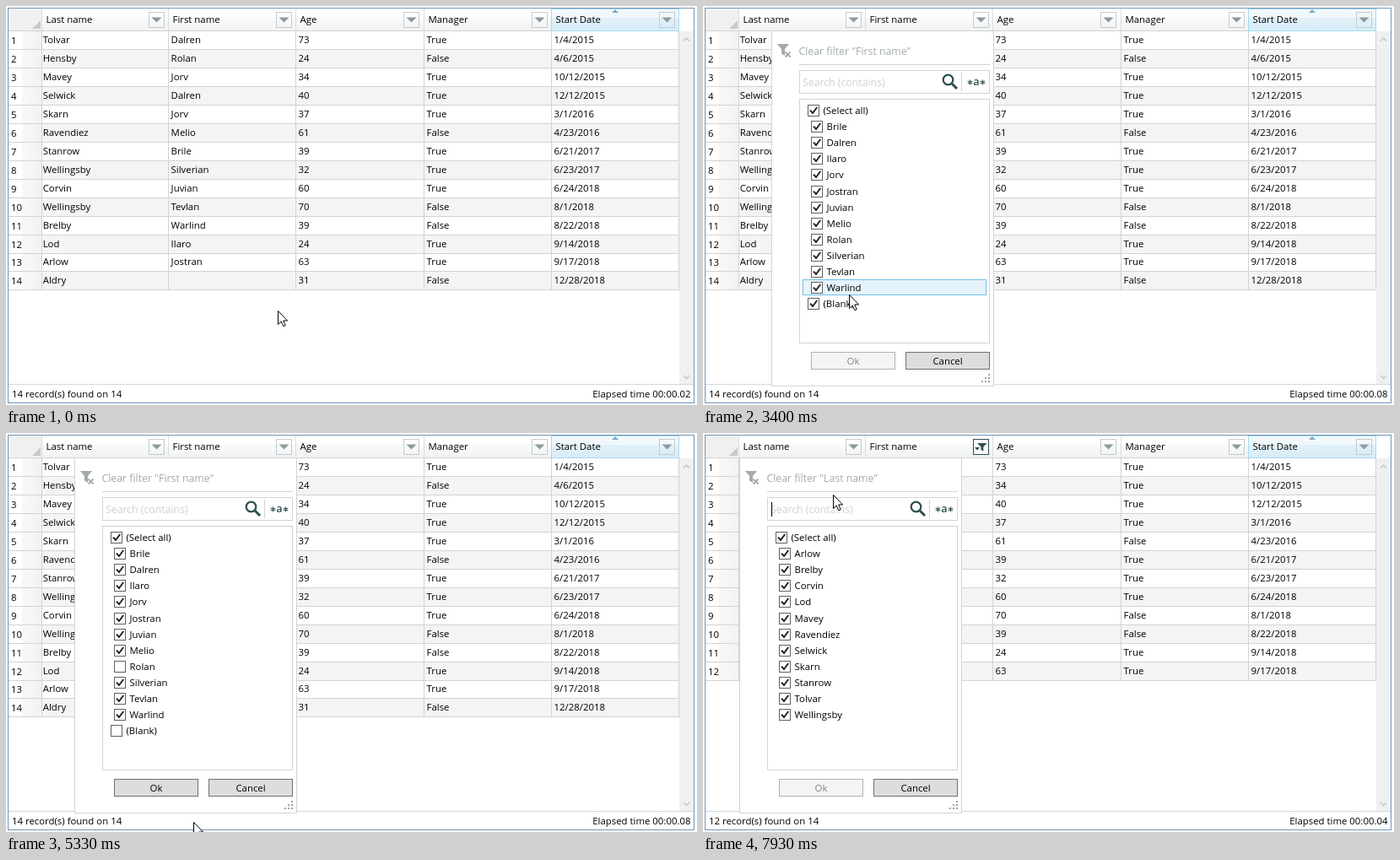
An HTML page that plays this animation: 819x473 px, repeating every 8000 ms.

```html
<!DOCTYPE html>
<html lang="en">
<head>
<meta charset="utf-8">
<title>Grid column filter</title>
<style>
html, body { margin: 0; width: 100%; height: 100%; overflow: hidden; background: #fff; }
svg { display: block; width: 819px; height: 473px; font: 11.4px "Open Sans", sans-serif; }
text { white-space: pre; }
rect { shape-rendering: crispEdges; }
.big { font-size: 12.3px; }
.off { display: none; }
</style>
</head>
<body>
<svg id="stage" viewBox="0 0 819 473">
  <defs>
    <linearGradient id="head" x2="0" y2="1">
      <stop offset=".4" stop-color="#fff"/><stop offset=".4" stop-color="#f9fafb"/><stop offset="1" stop-color="#f1f2f4"/>
    </linearGradient>
    <linearGradient id="side">
      <stop offset=".4" stop-color="#fff"/><stop offset=".4" stop-color="#f7f8fa"/><stop offset="1" stop-color="#f1f2f4"/>
    </linearGradient>
    <linearGradient id="sorted" x2="0" y2="1">
      <stop offset="0" stop-color="#f2f9fc"/><stop offset=".4" stop-color="#f0f8fc"/>
      <stop offset=".4" stop-color="#e1f1f9"/><stop offset="1" stop-color="#d8ecf6"/>
    </linearGradient>
    <linearGradient id="hot" x2="0" y2="1">
      <stop offset=".4" stop-color="#e3f7ff"/><stop offset=".4" stop-color="#bdedff"/><stop offset="1" stop-color="#b7e7fb"/>
    </linearGradient>
  </defs>
</svg>
<script>
const TICK = 1000 / 15, LOOP = 8000;
const LINE = '#d3d3d3', DARK = '#2f4f4f';
const EDGES = [42, 192, 343, 495, 646, 797];
const HEADS = ['Last name', 'First name', 'Age', 'Manager', 'Start Date'];
const ROWS = `Tolvar,Dalren,73,True,1/4/2015
Hensby,Rolan,24,False,4/6/2015
Mavey,Jorv,34,True,10/12/2015
Selwick,Dalren,40,True,12/12/2015
Skarn,Jorv,37,True,3/1/2016
Ravendiez,Melio,61,False,4/23/2016
Stanrow,Brile,39,True,6/21/2017
Wellingsby,Silverian,32,True,6/23/2017
Corvin,Juvian,60,True,6/24/2018
Wellingsby,Tevlan,70,False,8/1/2018
Brelby,Warlind,39,False,8/22/2018
Lod,Ilaro,24,True,9/14/2018
Arlow,Jostran,63,True,9/17/2018
Aldry,,31,False,12/28/2018`.split('\n').map(r => r.split(','));
const UNCHECKED = 'Rolan';
const KEPT = ROWS.filter(r => r[1] && r[1] !== UNCHECKED);

// Pointer path: tick, x, y
const PATH = [
  [13, 322, 361], [15, 320, 345], [18, 316, 255], [22, 319, 130], [26, 329, 49], [28, 331, 26], [31, 331, 18],
  [45, 331, 18], [46, 326, 30], [48, 270, 150], [50, 196, 305], [51, 173, 342], [54, 150, 350], [58, 131, 351],
  [62, 131, 351], [64, 141, 325], [66, 149, 298], [69, 146, 285], [73, 136, 278],
  [74, 136, 278], [77, 172, 360], [80, 222, 461], [82, 215, 462], [85, 182, 421],
  [94, 182, 421], [96, 180, 370], [99, 176, 190], [102, 173, 62], [103, 174, 47], [105, 178, 26], [108, 180, 21],
  [117, 180, 21], [119, 154, 73]
];

const fill = (x, y, w, h, color, attrs = '') =>
  `<rect x="${x}" y="${y}" width="${w}" height="${h}" fill="${color}" ${attrs}/>`;
const box = (x, y, w, h, color, stroke, attrs = '') =>
  fill(x + .5, y + .5, w - 1, h - 1, color, `stroke="${stroke}" ${attrs}`);
const text = (x, y, s, color = '#000', attrs = '') =>
  `<text x="${x}" y="${y}" fill="${color}" ${attrs}>${s}</text>`;
const path = (d, color, attrs = '') => `<path d="${d}" fill="${color}" ${attrs}/>`;
const stroke = (d, color, width) => path(d, 'none', `stroke="${color}" stroke-width="${width}"`);
const group = (id, body, cls = '') => `<g id="${id}" class="${cls}">${body}</g>`;

function header() {
  let s = fill(3, 3, 795, 26, 'url(#head)') + fill(3, 3, 39, 26, '#f0f0f0') +
    fill(0, 3, 150, 26, 'url(#hot)', 'id="hover" class="off"') +
    fill(3, 29, 795, 1, LINE) + path('M41 17V27H31Z', '#c9c9c9');
  EDGES.forEach(x => s += fill(x, 3, 1, 26, '#d9dde0'));
  s += box(646, 3, 152, 27, 'url(#sorted)', '#a4d8ef') + path('M718 8L722 4L726 8Z', '#7aaac4');
  HEADS.forEach((name, i) => {
    const b = Math.round(169 + 151.2 * i);
    s += text(EDGES[i] + 5.5, 20, name) + box(b, 7, 19, 19, 'none', '#c6cacc') +
      path(`M${b + 3.5} 13.5h12l-6 6Z`, '#8d9b9e');
  });
  return s + group('funnel', box(320, 7, 19, 19, '#fafafa', DARK) +
    path('M325 12H336.5L332.3 16.5V21.5L329.5 20V16.5Z', DARK) + path('M322 17h6l-3 3.5Z', DARK), 'off');
}

function grid(rows) {
  const edge = i => Math.round(29.5 + 21.92 * i);
  const end = edge(rows.length);
  let s = fill(3, 30, 39, end - 30, 'url(#side)');
  rows.forEach((row, i) => {
    const y = edge(i) + 1, base = Math.round(44.42 + 21.92 * i);
    if (i % 2) s += fill(43, y, 754, edge(i + 1) - y, '#f4f4f4');
    s += fill(3, edge(i + 1), 795, 1, LINE) + text(6, base + 1, i + 1);
    row.forEach((cell, c) => s += text(c ? EDGES[c] + 3.6 : 43.7, base, cell));
  });
  EDGES.forEach(x => s += fill(x, 30, 1, end - 29, LINE));
  return s;
}

function check(x, y, id) {
  return box(x - 7, y - 7, 14, 14, '#fff', '#606060', `id="${id}box"`) +
    group(id, stroke(`M${x - 4} ${y - .3}L${x - 1} ${y + 3}L${x + 4.2} ${y - 4}`, '#212121', 2));
}

function button(x, label, id) {
  return box(x, 410, 100, 21, '#ddd', '#707070', `id="${id}"`) +
    text(x + 50, 425, label, '#000', `text-anchor="middle" id="${id}text"`);
}

// A filter popup laid out for x = 81, then shifted
function popup(id, dx, title, items) {
  const gray = '#a3abab';
  let s = box(81, 29, 264, 422, '#fff', '#d0d4d6') +
    path('M88 45H102L97 51V59L93 56.5V51Z', gray) + stroke('M97.5 54.5L103.5 60.5M103.5 54.5L97.5 60.5', gray, 1.8) +
    text(113.5, 58, `Clear filter "${title}"`, gray, 'class="big"') + fill(114, 69, 226, 1, LINE) +
    box(114, 76, 226, 28, '#fff', LINE) + text(118, 95, 'Search (contains)', '#d0d0d0', 'class="big"') +
    fill(119, 82, 1, 17, '#000', `id="${id}caret"`) +
    `<circle cx="290.5" cy="87.5" r="5.8" fill="none" stroke="${DARK}" stroke-width="2.2"/>` +
    stroke('M294.5 91.5L301 98', DARK, 3) + fill(306, 79, 1, 22, LINE) +
    text(324, 94, 'a', DARK, 'text-anchor="middle" font-weight="600" font-size="12.5"');
  for (const x of [316.5, 331.5])
    s += stroke(`M${x} 87.5v6M${x - 2.7} 89l5.4 3M${x + 2.7} 89l-5.4 3`, DARK, 1.1);
  s += box(114, 110, 226, 290, '#fff', LINE) +
    box(118, 0, 218, 19, '#e5f3fb', '#70c0e7', `id="${id}row" class="off"`);
  items.forEach((name, i) => {
    const y = Math.round(124 + 19.1 * i), x = name[0] === '(' ? 131 : 135;
    s += check(x, y, id + i) + text(x + 11.5, y + 4, name);
  });
  s += button(128, 'Ok', id + 'ok') + button(240, 'Cancel', id + 'cancel');
  for (let i = 0; i < 3; i++)
    for (let j = 2 - i; j < 3; j++) s += fill(330 + 4 * j, 436 + 4 * i, 2, 2, '#a5a5a5');
  return `<g id="${id}" class="off" transform="translate(${dx})">${s}</g>`;
}

const names = (rows, c) => ['(Select all)', ...[...new Set(rows.map(r => r[c]))].filter(Boolean).sort()];
const firstNames = [...names(ROWS, 1), '(Blank)'];
const BLANK = firstNames.length - 1, PICK = firstNames.indexOf(UNCHECKED);

document.getElementById('stage').innerHTML +=
  fill(0, 0, 819, 473, '#fff') + fill(798, 30, 17, 418, '#f0f0f0') +
  stroke('M803 41.5L806.5 38L810 41.5M803 438L806.5 441.5L810 438', '#c4c4c4', 1.3) +
  header() + group('all', grid(ROWS)) + group('kept', grid(KEPT)) +
  fill(3, 448, 812, 1, '#cbd8e3') +
  text(7, 464, '', '#000', 'id="count"') + text(811.5, 464, '', '#000', 'id="time" text-anchor="end"') +
  box(2, 2, 814, 469, 'none', '#6f94b8') +
  popup('p', 0, HEADS[1], firstNames) + popup('q', -38, HEADS[0], names(KEPT, 0)) +
  group('arrow', path('M.5 .5V16.5L4.2 13L6.8 18.7L9.2 17.7L6.7 12H11.6Z', '#fff', 'stroke="#000"')) +
  group('ring', '<circle r="7.4" fill="none" stroke="#1c80cf" stroke-width="5"/>' +
    stroke('M-7.4 0A7.4 7.4 0 0 1 0 -7.4', '#58b0ea', 3));

const $ = id => document.getElementById(id);
const show = (id, on) => $(id).classList.toggle('off', !on);
const within = (n, a, b) => n >= a && n < b;
function paint(id, color, line) {
  $(id).setAttribute('fill', color);
  $(id).setAttribute('stroke', line);
}

function pointer(n) {
  const k = PATH.findIndex(p => p[0] >= n);
  if (k < 1) return PATH[0].slice(1);
  const [a, ax, ay] = PATH[k - 1], [b, bx, by] = PATH[k], f = (n - a) / (b - a);
  return [Math.round(ax + (bx - ax) * f), Math.round(ay + (by - ay) * f)];
}

function render(n) {
  const [x, y] = pointer(n);
  const busy = within(n, 38, 40) || within(n, 88, 91) || within(n, 113, 116);
  const open = within(n, 40, 91), open2 = n >= 116, filtered = n >= 91;

  show('arrow', !busy);
  show('ring', busy);
  for (const id of ['arrow', 'ring']) $(id).setAttribute('transform', `translate(${x} ${y})`);

  const hover = y < 29 && !busy && !open && !open2;
  show('hover', hover);
  $('hover').setAttribute('x', x < 193 ? 43 : 193);

  show('all', !filtered);
  show('kept', filtered);
  show('funnel', filtered);
  $('count').textContent = `${filtered ? 12 : 14} record(s) found on 14`;
  const spent = n < 38 ? 2 : n < 40 ? 0 : n < 91 ? 8 : n < 113 ? 9 : n < 116 ? 0 : 4;
  $('time').textContent = `Elapsed time 00:00.0${spent}`;

  show('p', open);
  show('q', open2);
  show('pcaret', n < 61 && (n - 40) % 16 < 8);
  show('p' + BLANK, n < 61);
  show('p' + PICK, n < 74);

  const row = Math.floor((y - 114.5) / 19.1);
  const onRow = within(x, 118, 336) && row >= 0 && row <= BLANK;
  show('prow', onRow);
  $('prow').setAttribute('y', Math.round(124 + 19.1 * row) - 9.5);
  firstNames.forEach((name, i) => {
    const mid = name[0] === '(' ? 131 : 135;
    const hot = onRow && i === row && Math.abs(x - mid) < 7;
    paint(`p${i}box`, hot ? '#f3f9ff' : '#fff', hot ? '#5593ff' : '#606060');
  });

  const onOk = within(x, 128, 228) && within(y, 410, 431);
  if (n < 61) paint('pok', '#f4f4f4', '#adb2b5');
  else if (n >= 88) paint('pok', '#c4e5f6', '#2c628b');
  else if (onOk) paint('pok', '#bee6fd', '#3c7fb1');
  else paint('pok', '#ddd', '#707070');
  $('poktext').setAttribute('fill', n < 61 ? '#838383' : '#000');
}

paint('qok', '#f4f4f4', '#adb2b5');
$('qoktext').setAttribute('fill', '#838383');

let last = -1;
const start = performance.now();
function loop() {
  const n = Math.floor(((performance.now() - start) % LOOP + 4) / TICK) % 120;
  if (n !== last) render(last = n);
  requestAnimationFrame(loop);
}
loop();
</script>
</body>
</html>
```
